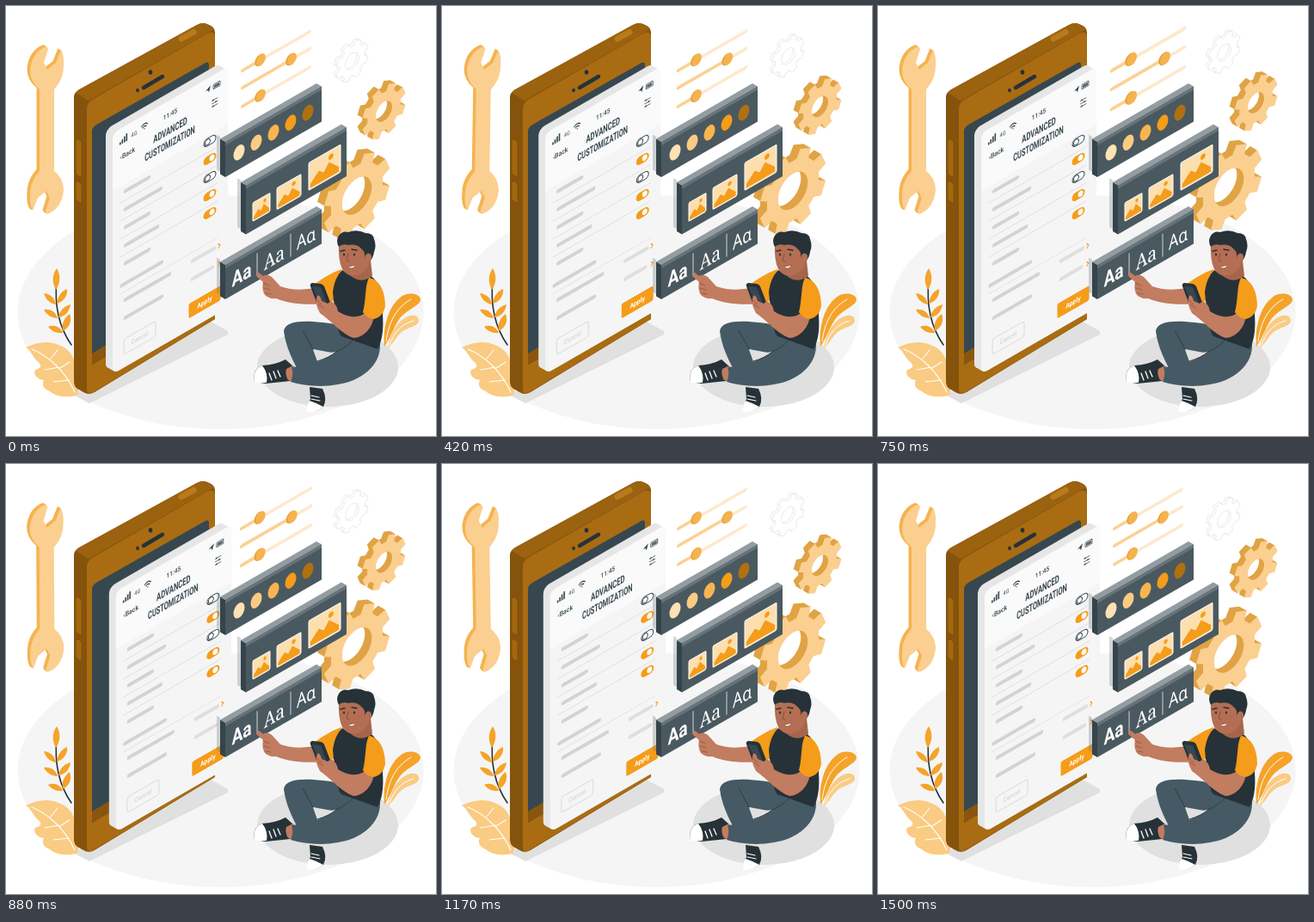
Animation of 500 by 500 pixels, one loop 1.54 s. Source, as an HTML page:

```html
<!DOCTYPE html>
<html lang="en">
<head>
<meta charset="utf-8">
<title>Advanced customization</title>
<style>
html, body { margin: 0; width: 100%; height: 100%; overflow: hidden; background: #fff; }
svg { display: block; width: 100vw; height: 100vh; }
text { text-anchor: middle; font-family: Roboto, "Open Sans", sans-serif; }
.ln { fill: none; stroke-linecap: round; stroke-linejoin: round; }
</style>
</head>
<body>
<svg viewBox="0 0 500 500">
  <ellipse cx="249.500" cy="356" rx="236" ry="136" fill="#f5f5f5"/>
  <path d="M78 452L97 462 258 382V378L236 366Z" fill="#e0e0e0"/>
  <ellipse cx="374" cy="420" rx="82" ry="46" fill="#e0e0e0"/>

  <g id="wrench"></g>

  <!-- left plants -->
  <g>
    <path d="M23 397C37 390 51 389 61 394C73 398 80 408 80 418C87 429 87 445 82 453C70 456 57 454 51 448C44 446 41 440 44 435C36 434 31 428 34 423C40 421 42 419 39 415C32 410 30 401 23 397Z" fill="#facb82"/>
    <path class="ln" d="M30 399C50 407 69 425 80 449M52 410L60 400M63 421L74 414M45 423L62 420M55 437L73 435" stroke="#fff" stroke-width="1.1"/>
    <path class="ln" d="M76 394C62 374 56 348 59 318" stroke="#263238" stroke-width="1.6"/>
    <g fill="#f5a32a">
      <path d="M58 330C53 321 54 312 59 305C64 313 63 323 58 330Z"/>
      <path d="M58 347C51 346 46 341 44 334C52 335 57 340 58 347Z"/>
      <path d="M60 363C53 363 47 359 44 353C52 352 58 356 60 363Z"/>
      <path d="M66 380C59 381 53 378 49 373C56 370 63 373 66 380Z"/>
      <path d="M59 346C60 338 64 332 71 329C72 337 67 344 59 346Z"/>
      <path d="M61 362C62 355 67 349 75 347C74 355 69 361 61 362Z"/>
      <path d="M66 378C64 370 68 362 74 358C77 366 74 374 66 378Z"/>
    </g>
  </g>

  <!-- right plant -->
  <path d="M440 396C438 374 444 348 461 337C470 332 481 335 482 341C482 349 464 353 456 366C450 376 446 388 440 396Z" fill="#f5a32a"/>
  <path d="M444 398C447 380 455 366 467 361C475 358 481 361 480 367C477 374 466 373 459 380C453 386 449 394 444 398Z" fill="#facb82"/>
  <path class="ln" d="M442 390C445 369 452 352 471 341M446 394C451 380 459 370 474 366" stroke="#fff" stroke-width="1"/>

  <g id="gears"></g>
  <g id="sliders"></g>

  <!-- phone -->
  <path d="M79 106Q79 101 84 98L222 22Q229 18 236 22Q243 25 243 31V364L103 449Q96 453 90 449L83 445Q79 442 79 437Z" fill="#85530c"/>
  <path d="M81 101Q82 99 85 97L222 22Q229 18 236 22Q241 24 242 27L96 110Z" fill="#9b620f"/>
  <path d="M94 120Q94 113 100 109L234 32Q243 28 243 36V364L103 448Q94 454 94 445Z" fill="#a96c13"/>
  <path d="M100 146Q100 141 105 138L232 66Q236 64 236 69V338L100 417Z" fill="#37474f"/>
  <path d="M100 404L127 388V401L100 417Z" fill="#8a560d"/>
  <path class="ln" d="M160 95L182 82" stroke="#263238" stroke-width="4.500"/>
  <ellipse cx="168" cy="77" rx="2.300" ry="2.800" fill="#263238"/>
  <ellipse cx="153" cy="98" rx="1.800" ry="2.200" fill="#263238"/>
  <path class="ln" d="M204 38L218 30.500" stroke="#b97a1c" stroke-width="7"/>
  <g fill="#a3680f" stroke="#7a4c0a" stroke-width=".7">
    <path d="M81 157Q81 154 84 155L87 157Q88 158 88 160V196Q88 200 85 198L82 196Q81 195 81 193Z"/>
    <path d="M81 206Q81 203 84 204L87 206Q88 207 88 209V226Q88 230 85 228L82 226Q81 225 81 223Z"/>
  </g>

  <g id="panel"></g>
  <g id="boxes"></g>

  <!-- person -->
  <g>
    <path d="M289 437Q286 422 298 418Q314 417 325 411L335 420Q326 429 331 436L302 439Z" fill="#263238"/>
    <path d="M289 438Q286 422 298 418Q305 427 303 438Z" fill="#fff"/>
    <path class="ln" d="M306 427l3 8M311 425l3 8M316 424l3 7" stroke="#fff" stroke-width="1.300"/>
    <path d="M326 422L334 418 337 437 328 435Q324 428 326 422Z" fill="#c27c60"/>
    <path d="M353 443L368 445Q374 457 369 466Q357 475 350 471Q350 464 354 457Z" fill="#263238"/>
    <path d="M350 472Q349 464 353 459Q362 462 369 466Q358 475 350 472Z" fill="#fff"/>
    <path class="ln" d="M355 453l9 2M355 457l10 2" stroke="#fff" stroke-width="1.200"/>
    <g fill="#455a64">
      <path d="M323 378C325 362 362 366 394 372L430 398 400 414 384 404 357 399 368 430 340 424C332 410 325 394 323 378Z"/>
      <path d="M435 393C436 419 412 436 386 440C365 444 345 441 331 437Q335 428 332 420C355 419 370 411 385 401L409 382Z"/>
    </g>
    <path d="M357 399Q370 405 384 402Q376 409 362 413Z" fill="#e0e0e0"/>
    <path class="ln" d="M345 377Q352 390 357 399M404 388Q396 397 384 402Q376 409 362 413" stroke="#2e3d45" stroke-width="1"/>

    <path d="M372 325C350 331 333 331 319 326L309 315Q303 311 299 314L294 310Q290 311 292 315L299 321Q297 330 301 336Q306 341 314 340C328 346 350 349 377 345Z" fill="#c27c60"/>
    <path class="ln" d="M299 322l7 3M300 328l7 2M302 334l6 1" stroke="#91523a" stroke-width=".8"/>
    <path d="M390 306C377 311 365 318 356 326Q366 334 367 344L388 343Z" fill="#f59c1a"/>
    <path d="M391 307Q382 316 380 332Q381 350 386 363Q384 377 390 384L432 399Q440 385 438 359C440 337 434 320 423 313Q406 319 391 307Z" fill="#263238"/>
    <path d="M401 303L424 296 426 314Q412 324 400 313Z" fill="#a5654b"/>
    <path d="M387 275Q386 296 391 306Q398 316 408 313Q420 310 423 297L424 273Q402 264 387 275Z" fill="#b36e53"/>
    <path d="M387 280Q383 273 387 267Q391 261 398 263Q408 259 418 264Q427 264 428 271Q431 279 428 286Q427 293 423 297L417 292Q418 286 414 283Q408 276 398 278Q391 276 387 280Z" fill="#263238"/>
    <ellipse cx="421" cy="293" rx="4" ry="5.500" fill="#b36e53" transform="rotate(15 421 293)"/>
    <path class="ln" d="M389 285l5-1M402 283l6 1" stroke="#263238" stroke-width="1.400"/>
    <ellipse cx="393" cy="289" rx="1.100" ry="1.600" fill="#263238"/>
    <ellipse cx="405" cy="289" rx="1.100" ry="1.600" fill="#263238"/>
    <path class="ln" d="M398 288l-2 8 3 1" stroke="#8b4b34" stroke-width=".9"/>
    <path d="M398 303Q402 303 406 301Q405 305 402 305Q399 305 398 303Z" fill="#fff" stroke="#80432f" stroke-width=".6"/>

    <path d="M354 326Q353 323 356 322L366 323Q369 324 370 326L378 347Q379 351 375 351L365 350Q363 350 362 347Z" fill="#263238"/>
    <path d="M356 326L366 327 373 346 364 345Z" fill="#37474f"/>
    <path d="M428 357C428 374 415 386 404 386C391 382 378 366 365 357Q358 345 362 337Q365 335 367 343L374 346 378 343Q385 347 386 355C395 361 407 364 416 358Z" fill="#c27c60"/>
    <path class="ln" d="M361 342l6 5M363 347l6 4" stroke="#91523a" stroke-width=".8"/>
    <path d="M422 316C434 318 441 331 441 349Q439 361 428 364Q419 363 415 356C419 341 417 326 422 316Z" fill="#f59c1a"/>
  </g>
</svg>
<script>
const $ = id => document.getElementById(id);
const SLOPE = .577;
const ORANGE = '#f59c1a', PALE = '#fbcf90', AMBER = '#f5b350', OCHRE = '#e0a345', DARK = '#37474f';
const iso = (x, y, body) => `<g transform="matrix(1 ${-SLOPE} 0 1 ${x} ${y})">${body}</g>`;
const rect = (x, y, w, h, r, fill, more = '') =>
  `<rect x="${x}" y="${y}" width="${w}" height="${h}" rx="${r}" fill="${fill}" ${more}/>`;
const line = (x1, y1, x2, y2, color, width) =>
  `<path class="ln" d="M${x1} ${y1}L${x2} ${y2}" stroke="${color}" stroke-width="${width}"/>`;
const label = (x, y, size, str, fill, weight = 400, sx = .866, more = '') =>
  `<text transform="translate(${x} ${y}) scale(${sx} 1)" font-size="${size}" font-weight="${weight}" fill="${fill}" ${more}>${str}</text>`;
// thickness: copies of one shape running back to the upper left
const extrude = (shape, depth, color) => {
  let s = '';
  for (let d = depth; d > 0; d -= .7) s += `<g fill="${color}" transform="translate(${-d} ${-d * SLOPE})">${shape}</g>`;
  return s;
};

function gear(cx, cy, r, root, hole, depth) {
  const pts = [];
  for (let i = 0; i < 8; i++)
    for (const [a, q] of [[-.25, root], [-.17, r], [.17, r], [.25, root]]) {
      const b = (i + .5) * Math.PI / 4 + a;
      pts.push([.866 * q * Math.cos(b), q * Math.sin(b) - .5 * q * Math.cos(b)].map(v => v.toFixed(2)).join(' '));
    }
  const k = .866 * hole, m = hole / 2;
  const d = `M${pts.join('L')}ZM${k} ${-m}` +
    [[0, 1], [-1, 0], [0, -1], [1, 0]].map(([c, s], i) => {
      const [pc, ps] = [[1, 0], [0, 1], [-1, 0], [0, -1]][i], f = .552;
      const p = (x, y) => `${(k * x).toFixed(2)} ${(hole * y - m * x).toFixed(2)}`;
      return `C${p(pc + f * c, ps + f * s)} ${p(c + f * pc, s + f * ps)} ${p(c, s)}`;
    }).join('') + 'Z';
  const shape = `<path fill-rule="evenodd" d="${d}"/>`;
  const white = depth < 4;
  const edge = white ? 'stroke="#e4e4e4" stroke-width=".8"' : '';
  const back = white ? `<g fill="#fff" transform="translate(${-depth} ${-depth * SLOPE})">${shape}</g>` : extrude(shape, depth, OCHRE);
  return `<g transform="translate(${cx} ${cy})" ${edge}>${back}<g fill="${white ? '#fff' : PALE}">${shape}</g></g>`;
}
$('gears').innerHTML = gear(402.5, 64, 22, 17.5, 9, 2.5) + gear(439.5, 122.5, 29.5, 22.5, 11, 6) +
  gear(408, 220.5, 45, 35, 20, 8);

const half = 'M56 145V97C62 90 67 82 67 69Q68 58 64 51L58 66 48 74 44 66 49 50 47 47C36 51 29 61 28 75Q28 88 39 97V145Z';
const tool = `<path d="${half}"/><path d="${half}" transform="rotate(180 47.5 144.5)"/>`;
$('wrench').innerHTML = extrude(tool, 3.5, AMBER) + `<g fill="${PALE}">${tool}</g>`;

$('sliders').innerHTML = [[75.5, 22], [95.5, 58], [117, 22]].map(([y, k]) => iso(274, y,
  line(1, 0, k, 0, '#fbd193', 4) + line(k, 0, 79, 0, '#fde9cd', 4) +
  `<ellipse cx="${k - 1}" cy="-.5" rx="5.700" ry="6.500" fill="#e5a03a"/><ellipse cx="${k + .5}" cy="0" rx="5.500" ry="6.500" fill="${AMBER}"/>`)).join('');

function page() {
  const ink = DARK, grey = '#d3d3d3', rule = '#e0e0e0';
  let s = rect(0, 0, 134, 280, 7, '#f5f5f5') +
    '<path d="M0 67V7Q0 0 7 0H127Q134 0 134 7V67Z" fill="#fafafa"/>';
  for (let i = 0; i < 4; i++) s += rect(8 + i * 2.5, 15.5 - i * 2, 1.6, 3 + i * 2, .3, ink);
  s += label(25, 17.5, 6.5, '4G', ink);
  s += '<path class="ln" d="M33.500 12Q37 8.500 40.500 12M35 14Q37 12 39 14M37 16v.2" stroke="#37474f" stroke-width="1.200"/>';
  s += label(67, 19, 7.5, '11:45', ink, 500);
  s += `<path d="M108 13.500L114 10 112 17 111 14Z" fill="${ink}"/>`;
  s += rect(117, 11, 8, 5.5, 1, 'none', `stroke="${ink}" stroke-width=".8"`) + rect(118, 12, 6, 3.5, .3, '#59666c');
  s += label(17.5, 36, 8, '‹Back', ink, 500);
  s += label(67, 39, 12.3, 'ADVANCED', ink, 700, .62) + label(66.5, 54.5, 12.3, 'CUSTOMIZATION', ink, 700, .6);
  for (let i = 0; i < 3; i++) {
    s += line(115.5, 29 + i * 3.5, 122, 29 + i * 3.5, ink, .8);
    s += `<circle cx="${i % 2 ? 120 : 117}" cy="${29 + i * 3.5}" r=".9" fill="${ink}"/>`;
  }
  [28, 42, 28, 38, 28].forEach((w, i) => {
    const y = 75.7 + i * 21, on = i % 2 || i == 4, t = y - 1.7;
    s += line(15, y, 14 + w, y, grey, 4.5);
    if (i) s += line(9, y - 10.5, 122, y - 10.5, rule, .9);
    s += rect(106, t - 4.3, 14, 8.6, 4.3, on ? ORANGE : '#fff', `stroke="${on ? ORANGE : ink}" stroke-width="1"`);
    s += `<ellipse cx="${on ? 115.5 : 110.5}" cy="${t}" rx="3" ry="3.300" fill="#fff" ${on ? '' : `stroke="${ink}" stroke-width="1"`}/>`;
  });
  s += line(10.5, 183, 57, 183, grey, 4.5) + line(9, 192, 122, 192, rule, .9);
  s += line(15, 202, 66, 202, grey, 4.5) + line(15, 223, 57, 223, grey, 4.5);
  for (const y of [202, 223]) {
    s += line(93, y, y < 210 ? 118 : 116, y, '#dedede', 4.5);
    s += `<path class="ln" d="M123 ${y - 2.5}l1.800 2.500-1.800 2.500" stroke="${ORANGE}" stroke-width="1.200"/>`;
  }
  s += rect(88.5, 249.5, 37, 17, 2, ORANGE) + label(107, 260.8, 8, 'Apply', '#fff', 700);
  s += rect(13, 247, 37, 18, 3, 'none', 'stroke="#dadada" stroke-width="1"') + label(31.5, 258.5, 7.5, 'Cancel', '#d6d6d6', 500);
  return s;
}
$('panel').innerHTML = extrude(iso(124, 148, rect(0, 0, 134, 280, 7, 'inherit')), 8, '#e6e6e6') + iso(124, 148, page());

function box(x, y, w, h, body) {
  const dx = 6, dy = 3.4, r = w * SLOPE;
  return `<path d="M${x - dx - 4} ${y - dy - 5}l4 2.300v${h}l-4 -2.300Z" fill="#6b777d" opacity=".3"/>` +
    `<path d="M${x - dx} ${y - dy}l${w} ${-r}l${dx} ${dy}L${x} ${y}Z" fill="#929ca1"/>` +
    `<path d="M${x - dx} ${y - dy}l${dx} ${dy}v${h}l${-dx} ${-dy}Z" fill="#35434a"/>` +
    iso(x, y, rect(0, 0, w, h, .5, '#4a5960') + rect(0, 0, w, 4, 0, '#66737a') + body);
}
const dots = ['#fde2b3', '#facb82', '#f8b54f', ORANGE, '#b0700f']
  .map((c, i) => `<ellipse cx="${16 + i * 20}" cy="21.500" rx="6.500" ry="8.500" fill="${c}"/>`).join('');
const pic = (x, y, w, h) => {
  const p = (a, b) => `${x + a * w} ${y + b * h}`;
  return rect(x, y, w, h, 1.5, '#fddfae', 'stroke="#fff" stroke-width="1"') +
    `<path d="M${p(.05, .95)}L${p(.05, .8)} ${p(.32, .5)} ${p(.47, .66)} ${p(.64, .4)} ${p(.95, .78)} ${p(.95, .95)}Z" fill="${ORANGE}"/>` +
    `<ellipse cx="${x + w * .7}" cy="${y + h * .24}" rx="${w * .08}" ry="${h * .1}" fill="${ORANGE}"/>`;
};
const fonts = label(19, 30.5, 24, 'Aa', '#fff', 700, .8) +
  label(57, 32.5, 23, 'Aa', '#fff', 400, .84, 'style="font-family:\'Noto Serif\',serif"') +
  label(94, 31, 22, 'Aɑ', '#fff', 400, .8, 'style="font-family:\'Noto Sans\',\'DejaVu Sans\',sans-serif"') +
  line(37, 8, 37, 34, '#cfd4d6', 1) + line(76, 8, 76, 34, '#cfd4d6', 1);
$('boxes').innerHTML = box(255, 158, 112, 41, dots) +
  box(279, 208.5, 117, 57, pic(8, 25, 20, 21.5) + pic(36, 24, 28, 25) + pic(73, 16, 37, 32)) +
  box(255, 301, 112, 40, fonts);

// motion
const soft = x => {
  let a = 0, b = 1;
  const c = (t, p, q) => 3 * (1 - t) ** 2 * t * p + 3 * (1 - t) * t * t * q + t ** 3;
  for (let i = 0; i < 20; i++) {
    const m = (a + b) / 2;
    if (c(m, .36, .19) < x) a = m; else b = m;
  }
  return c(a, .07, .97);
};
const track = (keys, p, ease = x => x) => {
  let i = 1;
  while (i < keys.length - 1 && keys[i][0] < p) i++;
  const [t0, v0] = keys[i - 1], [t1, v1] = keys[i];
  return v0 + (v1 - v0) * ease((p - t0) / (t1 - t0));
};
const shake = [0, -1, 2, -4, 4, -4, 4, -4, 2, -1, 0].map((v, i) => [i / 10, v]);
const lift = [[0, 0], [.5, -10], [1, 0]];
const sway = [[0, 0], [.25, 1], [.75, -1], [1, 0]];
const beat = [[0, 1], [.12, 1.08], [.3, 1], [.4, 1], [.5, 1.08], [.64, 1], [1, 1]];
const LOOP = 1540, STEPS = 37;

function draw(ms) {
  const step = Math.floor(ms % LOOP / LOOP * STEPS + .12) % STEPS;
  const p = step / (STEPS - 1);
  const k = track(beat, p);
  $('panel').setAttribute('transform', `translate(${track(shake, p, soft)} 0)`);
  $('gears').setAttribute('transform', `translate(0 ${track(lift, p)})`);
  $('wrench').setAttribute('transform', `rotate(${track(sway, p)} 46 144)`);
  $('sliders').setAttribute('transform', `translate(314 73) scale(${k}) translate(-314 -73)`);
}
const start = performance.now();
function tick() {
  draw(performance.now() - start);
  requestAnimationFrame(tick);
}
tick();
</script>
</body>
</html>
```
